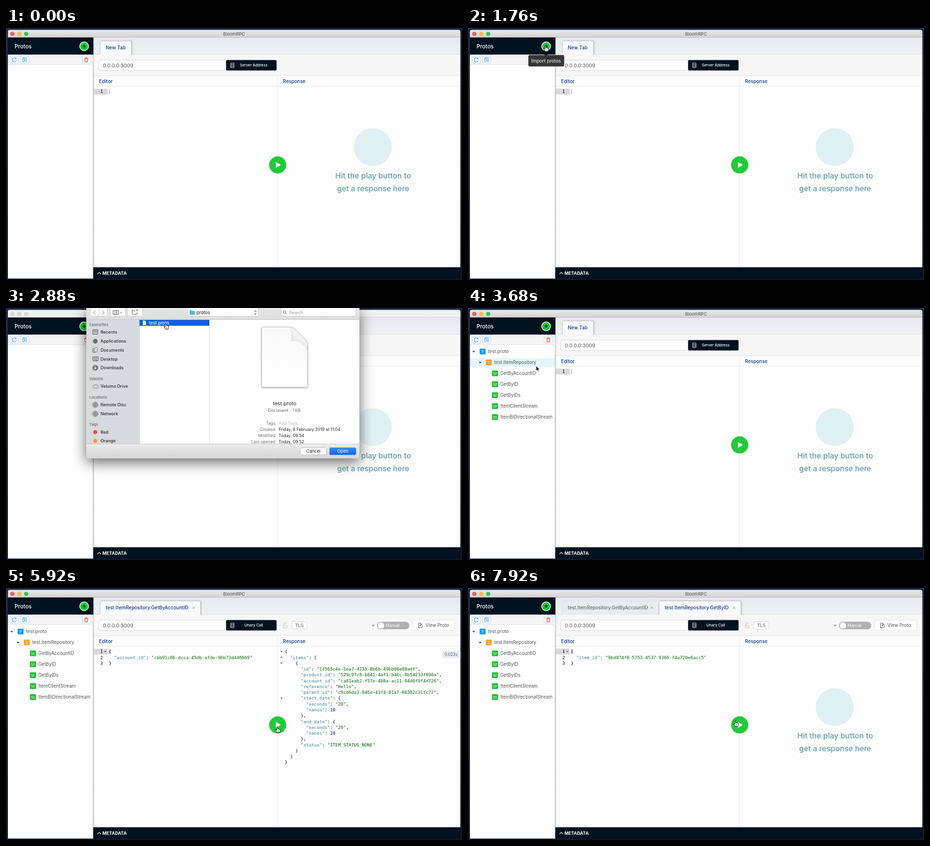
Animation of 960 by 531 pixels, one loop 8000 ms. Source, as an HTML page:

```html
<!DOCTYPE html>
<html lang="en">
<head>
<meta charset="utf-8">
<title>Proto client</title>
<style>
html, body { margin: 0; width: 100%; height: 100%; overflow: hidden; background: #131c2e; }
svg { display: block; width: 960px; height: 531px; }
text { font-family: Inter, "Open Sans", sans-serif; }
.code { font: 9.3px "DejaVu Sans Mono", monospace; }
.key { fill: #318495; }
.str { fill: #036a07; }
.num { fill: #0000cd; }
.tab { filter: drop-shadow(1px 0 1px #0004); }
.panel { filter: drop-shadow(0 8px 14px #0009); }
.paper { filter: drop-shadow(0 1px 2px #0006); }
</style>
</head>
<body>
<script>
const LOOP = 8000, STEP = 80;
const NAVY = '#001120', GREEN = '#20cb36', BLUE = '#0b3d8c', GREY = '#555';

const attrs = o => Object.entries(o).map(([k, v]) => ` ${k}="${v}"`).join('');
const rect = (x, y, w, h, fill, o = {}) =>
  `<rect x="${x}" y="${y}" width="${w}" height="${h}" fill="${fill}"${attrs(o)}/>`;
const box = (x, y, w, h, fill = '#fff', stroke = '#d6d6d6', rx = 2.5, o = {}) =>
  rect(x + .5, y + .5, w - 1, h - 1, fill, { stroke, rx, ...o });
const dot = (x, y, r, fill, o = {}) => `<circle cx="${x}" cy="${y}" r="${r}" fill="${fill}"${attrs(o)}/>`;
const text = (x, y, s, size, fill, weight = 400, anchor = 'start') =>
  `<text x="${x}" y="${y}" font-size="${size}" fill="${fill}" font-weight="${weight}" text-anchor="${anchor}">${s}</text>`;
const line = (d, stroke, w = 1, o = {}) =>
  `<path d="${d}" fill="none" stroke="${stroke}" stroke-width="${w}"${attrs(o)}/>`;
const shape = (d, fill, o = {}) => `<path d="${d}" fill="${fill}"${attrs(o)}/>`;
const group = (id, ...parts) => `<g id="${id}">${parts.join('')}</g>`;
const caret = (x, y, fill = '#444', r = 3) => shape(`M${x - r} ${y - r / 2}h${2 * r}l${-r} ${r * 1.2}z`, fill);

// Code lines
const colour = s => s.replace(/("[^"]*")(:?)|\d+/g, (m, str, colon) =>
  str ? `<tspan class="${colon ? 'key' : 'str'}">${str}</tspan>${colon}` : `<tspan class="num">${m}</tspan>`);
const code = (x, src, paint = colour) => src.split('\n').map((l, i) => {
  const body = l.trimStart(), indent = l.length - body.length;
  return `<text class="code" x="${x + indent * 5.6}" y="${137.4 + i * 12.26}">${paint(body)}</text>`;
}).join('');
const lineNumbers = s => code(198.5, s, n => n);
const request = (id, key, value) => group(id,
  code(216.5, `{\n  "${key}": "${value}"\n}`), lineNumbers('\n2\n3'), caret(209, 134, '#555', 2.3));
const reply = `{
  "items": [
    {
      "id": "1f505c4e-1ea7-4735-8b6b-49bb98e88adf",
      "product_id": "529c97c8-b841-4af1-b46c-8b54233f890a",
      "account_id": "ca81eab2-f57e-488a-ac11-04d6f9f4d726",
      "reference": "Hello",
      "parent_id": "c9cd6da3-046e-41f4-81a7-88382c31fc72",
      "start_date": {
        "seconds": "20",
        "nanos": 10
      },
      "end_date": {
        "seconds": "20",
        "nanos": 10
      },
      "status": "ITEM_STATUS_NONE"
    }
  ]
}`;

// Main window
const lights = (fills, edge) => fills.map((f, i) =>
  dot(13.5 + i * 14.5, 12.5, 4.3, f, { stroke: edge, 'stroke-width': .6 })).join('');
const titleBar = (fill, edge) =>
  shape('M4 20V8q0-4 4-4H952.5q4 0 4 4V20z', fill) + line('M4 19.5H956.5', edge);

const tab = (x, w, label, active = true, close = true) =>
  shape(`M${x + .5} 57V29.5q0-2 2-2h${w - 5}q2 0 2 2V57z`, active ? '#fafafa' : '#e9ebef',
    { stroke: active ? '#c6c8cc' : '#dadce0', class: active ? 'tab' : '' }) +
  text(x + 12, 45, label, active ? 10 : 9.9, active ? BLUE : GREY, active ? 500 : 400) +
  (close ? line(`M${x + w - 17.5} 39.2l5 5m0-5l-5 5`, '#888', .9) : '');

const sidebar = [
  rect(4, 20, 179.5, 508, '#fefefe'), rect(4, 20, 180, 36, NAVY),
  text(18, 43, 'Protos', 11.7, '#fff', 500),
  dot(164.5, 38.5, 9.3, GREEN, { stroke: '#fff', 'stroke-width': 1.4 }),
  line('M160.5 38.5h8m-4-4v8', NAVY, 1.3),
  rect(4, 56, 179.5, 21, '#f5f5f5'), line('M4 77.5H183.5', '#dedede'),
  box(8, 59, 19, 16), box(30, 59, 19, 16), box(160, 59, 18.5, 16),
  line('M20.6 64.2a4.3 4.3 0 1 0 1 4M21.3 62v2.8h-2.8', '#1890ff', 1.1),
  line('M38 71.5h-2.5v-9h7.5v4M37 65h4M37 67.5h2', '#1890ff'),
  dot(41, 69, 1.9, 'none', { stroke: '#1890ff' }), line('M42.3 70.3l1.7 1.7', '#1890ff'),
  line('M164.5 64.5h9M167.5 64v-1.5h3v1.5M165.8 65l.5 6.5h5.4l.5-6.5', '#e5303a', 1.1)
].join('');

const node = (x, y, letter, fill, label) =>
  rect(x, y - 6, 12.5, 12, fill) + text(x + 6.2, y + 3, letter, 8, '#fffc', 400, 'middle') +
  text(x + 17.5, y + 3.3, label, 9.7, GREY);
const methods = ['GetByAccountID', 'GetByID', 'GetByIDs', 'ItemClientStream', 'ItemBiDirectionalStream'];
const hover = (id, y) => group(id, rect(4, y - 9, 179, 18, '#e4f5fe'));
const tree = [
  hover('hoverRepo', 115), hover('hoverFirst', 138), hover('hoverSecond', 161),
  caret(12, 92), caret(25.5, 115),
  node(24.5, 91.7, 'P', '#149cea', 'test.proto'),
  node(37.5, 114.7, 'S', '#faa22d', 'test.ItemRepository'),
  ...methods.map((m, i) => node(50.5, 137.7 + i * 23, 'M', '#1cbf2c', m))
].join('');

const callLabel = (id, s) => group(id, text(521.5, 81.3, s, 7.9, '#fff', 500, 'middle'));
const extras = group('extras',
  box(583, 78, 9, 6.5, 'none', '#bbb', 1), line('M585 78v-2.5a2.5 2.5 0 0 1 5 0', '#bbb'),
  dot(587.5, 81, .7, '#bbb'),
  box(601, 70, 33, 17), text(617.5, 82, 'TLS', 9.6, GREY, 400, 'middle'),
  caret(773, 79, '#aaa', 3.5), rect(781, 71, 68, 16, '#b1b1b1', { rx: 8 }),
  dot(789.5, 79, 6.8, '#fff'), text(799, 82, 'Manual', 8.6, '#fff'),
  box(856, 67, 89, 23, '#fff', '#d4d4d4', 2.5, { 'stroke-dasharray': '2 1.5' }),
  line('M868.5 74h4.5l3 3v6.5h-7.5zM873 74v3h3M870.5 79h3.5M872.2 77.5v4', '#555', .9),
  text(883, 82, 'View Proto', 9.7, GREY));

const blank = group('blank',
  dot(772, 251, 40, '#e0f1f4'),
  text(773, 317.3, 'Hit the play button to', 16, '#619cac', 500, 'middle'),
  text(773, 343.8, 'get a response here', 16, '#619cac', 500, 'middle'));

const main = [
  rect(183, 20, 773.5, 36, 'url(#strip)'), line('M184 55.5H956.5', '#d9dbdf'),
  group('tabNew', tab(198, 66.5, 'New Tab', true, false)),
  group('tabOne', tab(198, 212, 'test.ItemRepository.GetByAccountID')),
  group('tabTwo', tab(198, 204, 'test.ItemRepository.GetByAccountID', false), tab(402, 173, 'test.ItemRepository.GetByID')),
  rect(184, 56, 772.5, 45, '#f7f7f7'), line('M184 100.5H956.5', '#e6e6e6'),
  box(195, 67, 270, 23), text(204, 82.6, '0.0.0.0:3009', 10.6, GREY),
  rect(463.3, 67.4, 106.3, 22.2, NAVY, { rx: 2 }),
  line('M473 74h7v9.5h-7zM473 77.2h7M473 80.4h7', '#fff', .9),
  callLabel('callServer', 'Server Address'), callLabel('callUnary', 'Unary Call'), extras,
  rect(184, 101, 772.5, 403.5, '#fdfdfd'), line('M184 122.5H956.5', '#ebebeb'), line('M571.5 101V504', '#ececec'),
  text(196, 116, 'Editor', 10.2, BLUE, 500), text(583, 116, 'Response', 10.1, BLUE, 500),
  rect(184, 128, 30, 12.3, '#d9d9d9'), lineNumbers('1'), line('M217.5 128v12', '#999'),
  request('editOne', 'account_id', 'cbb91c86-dcca-45db-afde-96b73d446069'),
  request('editTwo', 'item_id', '9bd874f8-5753-4537-9366-f4a720e6acc5'),
  blank,
  group('reply', code(587, reply), ...[0, 1, 2, 8].map(i => caret(580, 134 + i * 12.26, '#555', 2.3)),
    rect(918, 132, 38.5, 15.5, '#e8ecf1', { rx: 2 }), text(923, 143, '0.022s', 8.5, '#5d6873')),
  dot(572, 288.5, 18.5, '#fff', { stroke: '#ddd' }), dot(572, 288.5, 17.9, GREEN),
  shape('M568.5 283v11l9.5-5.5z', '#fff', { stroke: '#fff', 'stroke-linejoin': 'round' }),
  rect(183.5, 20, 3, 484, 'url(#edge)'),
  rect(184, 504.3, 772.5, 23.7, NAVY), line('M192.5 518.5l3.8-3.8 3.8 3.8', '#fff', 1.1),
  text(203, 519.7, 'METADATA', 9.25, '#fff', 700)
].join('');

const tooltip = group('tooltip', shape('M160.5 57l4-4 4 4z', '#000c'),
  rect(127, 57, 75.5, 24, '#000', { rx: 3, opacity: .78 }),
  text(164.5, 72.8, 'Import protos', 9.8, '#fff', 400, 'middle'));

// File panel
const INK = '#6c6d70';
const place = (y, label, icon) => icon + text(199, y + 3.3, label, 9.1, '#2c2c2c', 500);
const heading = (y, label) => text(175.5, y + 2.8, label, 7.9, '#707275', 600);
const ring = y => dot(188, y, 5.5, '#aaa', { stroke: INK }) + dot(188, y, 2.3, 'none', { stroke: INK });
const fact = (y, label, value, fill = '#222') =>
  text(567, y + 3, label, 8.6, '#808080', 500, 'end') + text(574, y + 3, value, 8.7, fill);
const sheet = (x, y, w, h, c, o) => shape(`M${x} ${y}h${w - c}l${c} ${c}v${h - c}h${-w}z`, '#fff', o);
const control = (x, w) => box(x, -3, w, 21, '#fdfdfd', '#c9c9c9', 3);

const panel = group('panel',
  shape('M169 0H744V313q0 4-4 4H173q-4 0-4-4z', '#ececec', { class: 'panel' }),
  shape('M169 286H744V313q0 4-4 4H173q-4 0-4-4z', 'url(#foot)'),
  rect(169, 0, 575, 24, 'url(#tool)'),
  control(177, 37), line('M195.5 0V18', '#d0d0d0'),
  line('M188 5.5l-3.5 4 3.5 4M203 5.5l3.5 4-3.5 4', '#888', 1.1),
  control(219, 33), control(255, 33),
  line('M225.5 5.5h11v8h-11zM229.2 5.5v8M232.8 5.5v8M240 8.5l2 2 2-2', '#555'),
  line('M272 6h-2.5l-1-1.5h-3v8.5h10.5v-4.5M274 4.500h4M276 2.5v4', '#555'),
  control(382, 149.5),
  shape('M386.5 4.5h4l1 1.5h6v8h-11z', '#4db9e8'), text(401, 13, 'protos', 9.3, '#333', 500),
  line('M522.5 8l2.3-2.5 2.3 2.5M522.5 11l2.3 2.5 2.3-2.5', '#444', 1.1),
  control(579, 158), dot(586.5, 8.5, 2.8, 'none', { stroke: '#555' }),
  line('M588.6 10.6l2.7 2.7', '#555'), text(596, 13, 'Search', 9.1, '#999'),
  rect(169, 24, 112, 263, '#d8dadd'), rect(281, 24, 463, 263, '#fff'),
  line('M169 24.5H744M169 286.5H744', '#c6c6c6'), line('M281.5 25V286M428.5 25V286', '#dcdcdc'),
  heading(35, 'Favourites'),
  place(51, 'Recents', box(182, 45, 12, 11, '#aaa', INK, 1.5) + line('M184 53h8', '#fff')),
  place(70, 'Applications', dot(188, 70, 5, INK)),
  place(89, 'Documents', box(182, 85, 8, 9, '#bbb', INK, 1) + box(185, 83, 8, 10, '#ddd', INK, 1)),
  place(107.5, 'Desktop', box(182, 102, 13, 10, '#bbb', INK, 1) + line('M184 109.5h9M184 105h9', INK)),
  place(126, 'Downloads', dot(188, 126, 5.8, INK) + line('M188 122.5v6m-2.5-2.5l2.5 2.5 2.5-2.5', '#fff', 1.2)),
  heading(149, 'Velumo'),
  place(165, 'Velumo Drive', line('M185 169h7a2.7 2.7 0 0 0 .3-5.3a4 4 0 0 0-7.3-.5a3 3 0 0 0 0 5.8z', INK)),
  heading(188, 'Locations'), place(204, 'Remote Disc', ring(204)), place(223, 'Network', ring(223)),
  heading(245.5, 'Tags'),
  place(261.5, 'Red', dot(188, 261.5, 4.3, '#fc3e40')), place(280, 'Orange', dot(188, 280, 4.3, '#fd9a28')),
  group('plainRow', sheet(288, 26.5, 7, 9.5, 2.5, { stroke: '#999', 'stroke-width': .6 }), text(301, 34.5, 'test.proto', 9.2, '#222')),
  group('chosen',
    rect(281, 25, 147, 12.5, '#0f5fdc'), sheet(288, 26.5, 7, 9.5, 2.5), text(301, 34.5, 'test.proto', 9.2, '#fff', 500),
    shape('M538.5 40.5H597Q604 41 608 45L630 67Q634.5 72 634.5 80V166.5H538.5z', 'url(#page)',
      { stroke: '#bbb', 'stroke-width': .7, class: 'paper' }),
    shape('M599 40.8Q604 56 600 69Q626 66 634.5 92V80Q634.5 72 630 67L608 45Q604 41 599 40.8z', 'url(#fold)',
      { stroke: '#ccc', 'stroke-width': .6 }),
    text(586.5, 205, 'test.proto', 10.9, '#222', 400, 'middle'),
    text(586, 219, 'Document - 1 KB', 8.6, '#777', 500, 'middle'),
    fact(243, 'Tags', 'Add Tags…', '#bbb'), fact(256, 'Created', 'Friday, 8 February 2019 at 11:04'),
    fact(269, 'Modified', 'Today, 09:54'), fact(282, 'Last opened', 'Today, 09:52')),
  rect(169, 287, 575, 4, '#ebebeb'),
  box(619, 294, 56, 15.5, '#fff', '#c4c4c4', 3), text(647, 305.2, 'Cancel', 9.2, '#222', 400, 'middle'),
  rect(681, 294, 56, 15.5, 'url(#open)', { rx: 3 }), text(709, 305.2, 'Open', 9.2, '#fff', 400, 'middle'));

const cursor = group('cursor',
  group('arrow', shape('M0 0V10.5L2.4 8.3L4 12L5.8 11.2L4.2 7.6H7.5Z', '#000', { stroke: '#fff', 'stroke-width': .8 })),
  group('hand',
    shape('M-1 1.2Q0-.6 1 1.2V5Q2.3 4 3.1 5.2Q4.4 4.5 5 5.7Q6.5 5.4 6.5 7V9.5Q6 11 5.5 12.5H-.5Q-1 11-2 10Q-4 8-3.8 6.8Q-2.5 6-1 8Z',
      '#fff', { stroke: '#000', 'stroke-width': .9, 'stroke-linejoin': 'round' }),
    line('M1.5 8.5v2.3M3.3 8.5v2.3', '#000', .6)));

const gradient = (id, a, b, dir = 'x2="0" y2="1"') =>
  `<linearGradient id="${id}" ${dir}><stop stop-color="${a}"/><stop offset="1" stop-color="${b}"/></linearGradient>`;
document.body.insertAdjacentHTML('afterbegin', `<svg viewBox="0 0 960 531"><defs>${[
  gradient('sky', '#202c43', '#0d1626'), gradient('bar', '#e9e9e9', '#d3d3d3'),
  gradient('strip', '#e8e9ed', '#eff0f3'), gradient('tool', '#e6e6e6', '#dedede'), gradient('foot', '#ebebeb', '#d6d6d6'),
  gradient('open', '#3a8df7', '#0d63e6'), gradient('page', '#f9f9f9', '#fff'),
  gradient('fold', '#dcdcdc', '#fff', 'y1="1" x2=".7" y2="0"'), gradient('edge', '#a4a8ae', '#fff0', '')
].join('')}</defs>${[
  rect(0, 0, 960, 531, 'url(#sky)'),
  titleBar('url(#bar)', '#b5b5b5'), lights(['#fc5b57', '#fdbc40', '#34c84a'], '#0003'),
  text(480, 16, 'BloomRPC', 9.2, '#4a4a4a', 400, 'middle'),
  group('idleBar', titleBar('#f0f0f0', '#d6d6d6'), lights(Array(3).fill('#d9d9d9'), '#bbb')),
  main, sidebar, group('tree', tree), tooltip, panel, cursor
].join('')}</svg>`);

// Motion: the whole clock ticks in equal steps
const play = (id, frames) => document.getElementById(id).animate(frames,
  { duration: LOOP, delay: -10, iterations: Infinity, easing: `steps(${LOOP / STEP})` });

// Times alternate between on and off
const show = (id, ...times) => {
  const key = (opacity, offset) => ({ opacity, offset, easing: 'step-end' });
  const keys = times.map((t, i) => key(1 - i % 2, t && (t - 20) / LOOP));
  if (times[0]) keys.unshift(key(0, 0));
  play(id, [...keys, key(times.length % 2, 1)]);
};

const OPEN = 2160, PICK = 2720, LOADED = 3120, FIRST = 4320, SENT = 5680, SECOND = 6880;
const timeline = {
  idleBar: [OPEN, LOADED], panel: [OPEN, LOADED], plainRow: [OPEN, PICK], chosen: [PICK, LOADED],
  tooltip: [1560, OPEN], tree: [LOADED],
  hoverRepo: [3600, 3840], hoverFirst: [3840, 4960], hoverSecond: [6560, 7360],
  tabNew: [0, FIRST], callServer: [0, FIRST], callUnary: [FIRST], extras: [FIRST],
  tabOne: [FIRST, SECOND], editOne: [FIRST, SECOND], tabTwo: [SECOND], editTwo: [SECOND],
  blank: [0, SENT, SECOND], reply: [SENT, SECOND],
  cursor: [480],
  arrow: [0, 1360, LOADED, 3840, 4640, 5280, 6160, 6560, 7280, 7840],
  hand: [1360, LOADED, 3840, 4640, 5280, 6160, 6560, 7280, 7840]
};
for (const id in timeline) show(id, ...timeline[id]);

const path = [
  [0, 600, 540], [400, 600, 540], [1360, 163, 37], [2400, 163, 37], [2720, 336, 32], [LOADED, 336, 32],
  [3680, 143.5, 122], [4000, 112, 136], [4480, 112, 136], [4800, 210, 169], [5360, 571, 292], [6080, 571, 292],
  [6640, 92, 158], [7120, 92, 158], [7920, 563, 279], [LOOP, 563, 279]
];
play('cursor', path.map(([t, x, y]) => ({
  transform: `translate(${x}px, ${y}px)`, offset: t / LOOP,
  easing: t === 4480 ? 'ease-in' : t === 4800 ? 'ease-out' : 'ease-in-out'
})));
</script>
</body>
</html>
```
